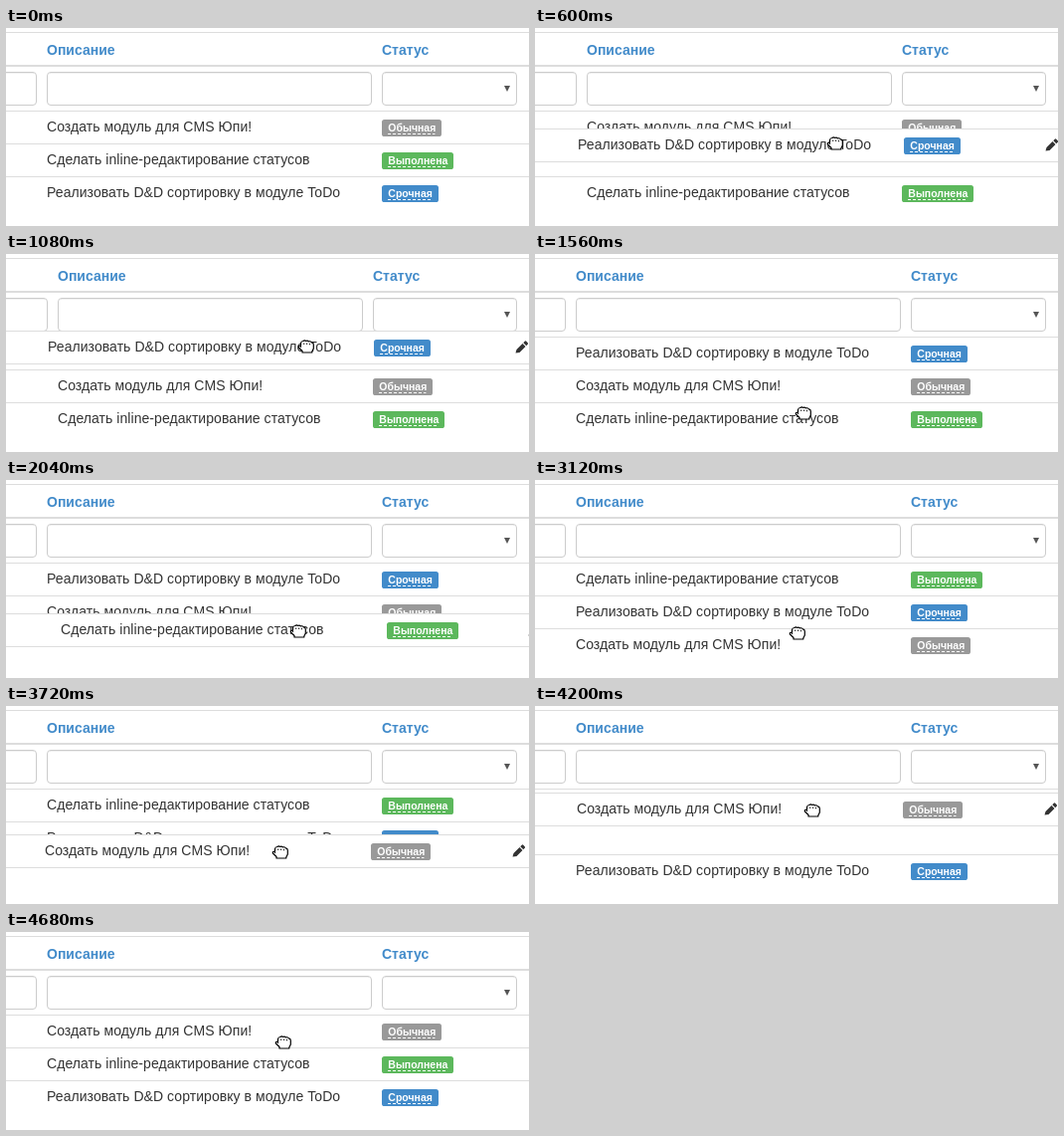
An HTML page that plays this animation: 526 px wide and 199 px high, repeating every 4800 ms.

```html
<!DOCTYPE html>
<html lang="ru">
<head>
<meta charset="utf-8">
<title>Сортировка</title>
<style>
  html, body { margin: 0; width: 100%; height: 100%; overflow: hidden; background: #fff; }
  svg { display: block; }
  text { font: 14px "Liberation Sans", Arial, sans-serif; letter-spacing: .06px; fill: #333; }
  .head { font-weight: bold; letter-spacing: 0; fill: #428bca; }
  .badge { font-size: 10.5px; font-weight: bold; letter-spacing: 0; fill: #fff; }
</style>
</head>
<body>
<svg id="stage" width="526" height="199" viewBox="0 0 526 199"></svg>
<script>
const STEP = 120, FRAMES = 40;
const FIRST = 99, PITCH = 33, LAST = FIRST + 2 * PITCH;

const tasks = [
  { title: 'Создать модуль для CMS Юпи!', status: 'Обычная', width: 60, color: '#999' },
  { title: 'Сделать inline-редактирование статусов', status: 'Выполнена', width: 72, color: '#5cb85c' },
  { title: 'Реализовать D&amp;D сортировку в модуле ToDo', status: 'Срочная', width: 57, color: '#428bca' }
];

// Each drag lifts the last row at a steady speed until it reaches the top.
// narrow: the columns shrink meanwhile.
const drags = [
  { from: 1.3, to: 9, speed: 13, top: 93, startX: 44.5, endX: 42, grip: { x: 259.5, y: -.5 }, narrow: true },
  { from: 15.9, to: 23, speed: 13.5, top: 89, startX: 52, endX: 67.4, grip: { x: 239, y: 1.5 } },
  { from: 29.1, to: 37, speed: 10.5, top: 95, startX: 38, endX: 42, grip: { x: 237, y: 1.5 } }
];
const rest = { step: 39, x: 279, y: 111 };

const lerp = (a, b, k) => a + (b - a) * k;

function rowAt(drag, step) {
  const y = Math.min(LAST, Math.max(drag.top, LAST - drag.speed * (step - drag.from)));
  return { x: lerp(drag.startX, drag.endX, (LAST - y) / (LAST - drag.top)), y };
}

function heldAt(drag, step) {
  const row = rowAt(drag, step);
  return { x: row.x + drag.grip.x, y: row.y + drag.grip.y };
}

// Between drags the pointer swings down to the next grab in a bow to the left.
function pointerAt(step) {
  const i = Math.max(0, drags.filter(d => d.from <= step).length - 1);
  const drag = drags[i], next = drags[i + 1];
  if (step <= drag.to) return heldAt(drag, step);
  const a = heldAt(drag, drag.to), b = next ? heldAt(next, next.from) : rest;
  const k = (step - drag.to) / ((next ? next.from : rest.step) - drag.to);
  const swing = .35 * Math.sin(Math.PI * k);
  return { x: lerp(a.x, b.x, k) - swing * (b.y - a.y), y: lerp(a.y, b.y, k + swing) };
}

const rect = (x, y, w, h, attrs) => `<rect x="${x}" y="${y}" width="${w}" height="${h}" ${attrs}/>`;
const line = (y, h = 1) => rect(0, y, 526, h, 'fill="#ddd"');
const label = (x, y, text, cls = '') => `<text x="${x}" y="${y}" class="${cls}">${text}</text>`;

function field(left, right) {
  return rect(left + .5, 44.5, right - left - 1, 33, 'rx="3.5" fill="#fff" stroke="#ccc"') +
    rect(left + 3, 45, right - left - 6, 1, 'fill="#000" opacity=".06"');
}

function row(task, y, textX, badgeX) {
  return label(textX, y + 5, task.title) +
    rect(badgeX, y - 7, task.width, 17, `rx="2.6" fill="${task.color}"`) +
    label(badgeX + 6.3, y + 5, task.status, 'badge') +
    `<path d="M${badgeX + 6} ${y + 7.5}h${task.width - 12.6}" stroke="#fff" stroke-dasharray="3 2"/>`;
}

function pencil(x, y) {
  return `<path transform="translate(${x} ${y})" fill="#333"
    d="M0 6.5L1 3L7 -3L10 0L4 6ZM7.8 -3.8L9.2 -5.3Q10 -6 10.8 -5.2L12.2 -3.8Q13 -3 12.2 -2.2L10.8 -.8Z"/>`;
}

function fist({ x, y }) {
  return `<g transform="translate(${Math.round(x)} ${Math.round(y)})" stroke="#000" stroke-width="1.2" stroke-linejoin="round">
    <path fill="#fff" d="M-5.5 -1V-3.5q.3 -2 2.5 -2q1.2 -1.2 2.7 0q1.5 -.8 2.7 .4q2.5 -.6 2.9 1q2 .2 2 2.2V2l-1.5 3V6H-4V4.5L-7.6 1q-.6 -2 2.1 -2Z"/>
    <path fill="none" stroke-width=".9" d="M-5.5 -1V1M-2.3 -3.5v1.5M.6 -3.5v1.5M3.5 -3.2v1.5"/></g>`;
}

function draw(step) {
  const drag = drags.find(d => step >= d.from && step <= d.to);
  const order = tasks.slice();
  drags.filter(d => step > d.to).forEach(() => order.unshift(order.pop()));

  const narrow = drag && drag.narrow;
  const textX = narrow ? 52 : 41, badgeX = narrow ? 369 : 378;
  let out = rect(0, 0, 526, 199, 'fill="#fff"') + line(4) + line(37, 2) +
    label(textX, 27, 'Описание', 'head') + label(badgeX, 27, 'Статус', 'head') +
    field(-40, textX - 10) + field(textX, badgeX - 10) + field(badgeX, 514) +
    '<path d="M501 58h6l-3 6z" fill="#555"/>';

  let lifted = '';
  if (drag) {
    const pose = rowAt(drag, step);
    const x = Math.round(pose.x), y = Math.round(pose.y);
    const task = order.pop();
    const slot = Math.max(0, Math.ceil((y - FIRST) / PITCH));
    order.splice(Math.min(2, slot), 0, null);
    lifted = rect(0, y - 16, 526, 33, 'fill="#fff"') + line(y - 16) + line(y + 17) +
      row(task, y, x, x + 328) + pencil(x + 470.5, y);
  }

  order.forEach((task, i) => {
    const y = FIRST + i * PITCH;
    out += line(y - 16);
    if (task) out += row(task, y, textX, badgeX);
  });
  out += lifted;
  if (step > 0) out += fist(pointerAt(step));
  document.getElementById('stage').innerHTML = out;
}

let shown = -1;
const start = performance.now();
function tick() {
  const step = Math.floor((performance.now() - start) / STEP) % FRAMES;
  if (step !== shown) draw(shown = step);
  requestAnimationFrame(tick);
}
tick();
</script>
</body>
</html>
```
